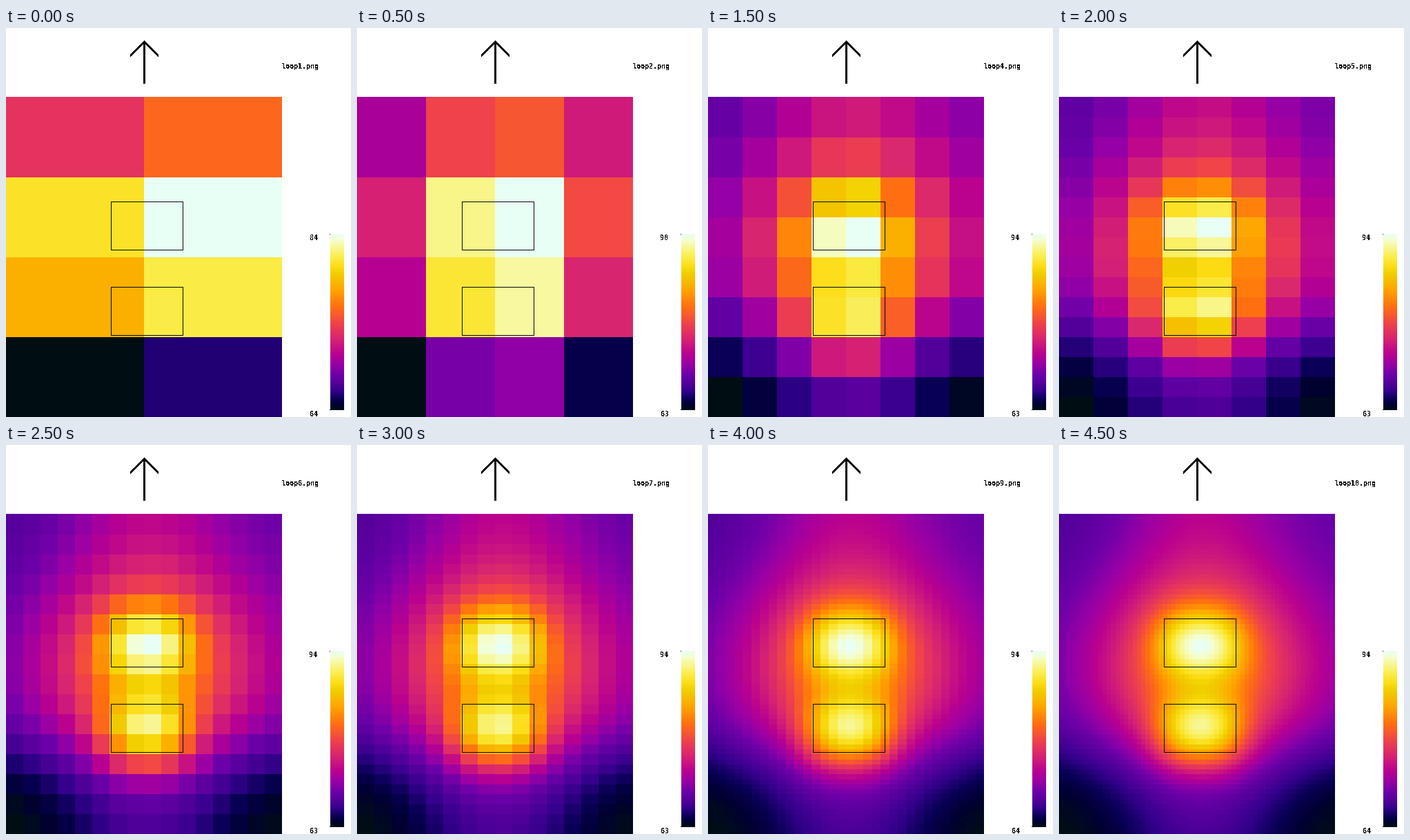
Animation, 500 px wide and 565 px high, one loop 5000 ms. Source, as a matplotlib script:

```python
import math
import numpy as np
import matplotlib.pyplot as plt
from matplotlib.animation import FuncAnimation

W, H, DPI = 500, 565, 100
PX = 72 / DPI
TOP, MAP_W, MAP_H = 100, 400, 465
BAR_X, BAR_Y, BAR_W, BAR_H = 470, 299, 20, 256
BOX_X, BOX_W, BOX_H = 152, 104, 70
BOX_TOPS = (252, 376)
FINE = 64
INK = "#000814"

# Key colours of the scale: position in percent and hex value
STOPS = """0 000e14, 3 000032, 6 080055, 10.5 32008a, 16 58009e, 20 6c00a8,
26 9800a5, 31.6 b80091, 40 d62273, 49.5 f04448, 59 ff7010, 68.5 ffa500,
78 f0d000, 81 fcda10, 87 faec48, 94 f7f9a8, 97 f4fed2, 100 e8fff5"""


def make_palette():
    pairs = [s.split() for s in STOPS.split(",")]
    pos = [float(p) / 100 for p, _ in pairs]
    rgb = np.array([[int(h[i:i + 2], 16) for i in (0, 2, 4)] for _, h in pairs])
    t = np.linspace(0, 1, 256)
    return np.stack([np.interp(t, pos, c) for c in rgb.T], 1).round().astype(np.uint8)


PALETTE = make_palette()
erf = np.vectorize(math.erf)


def colour(v):
    return PALETTE[np.rint(v * 255).astype(int)]


def bell(t, mid, spread):
    return np.exp(-((t - mid) / spread) ** 2 / 2)


def slab(t, start, size, blur=28):
    """A block from start to start + size with blurred edges."""
    s = blur * math.sqrt(2)
    return (erf((t - start) / s) - erf((t - start - size) / s)) / 2


def unit(v):
    return (v - v.min()) / (v.max() - v.min())


def make_field():
    """Two heated blocks in a wide glow, a warm middle and a cold lower end."""
    x = (np.arange(FINE) + 0.5) * MAP_W / FINE
    y = TOP + (np.arange(FINE)[:, None] + 0.5) * MAP_H / FINE
    base = (0.15 + 0.04 * x / MAP_W) / (1 + np.exp((y - 445) / 30))
    ridge = 0.135 * bell(x, 206, 82)
    glow = 0.35 * bell(x, 206, 120) * bell(y, 325, 95)
    upper = 0.50 * slab(y, BOX_TOPS[0], BOX_H)
    lower = 0.59 * slab(y, BOX_TOPS[1] + 6, BOX_H)
    return unit(base + ridge + glow + (upper + lower) * slab(x, BOX_X, BOX_W))


FIELD = make_field()


def heat_map(k):
    """Cell means of step k; each step doubles columns or rows in turn."""
    cols, rows = 2 ** (1 + (k + 1) // 2), 2 ** (2 + k // 2)
    v = unit(FIELD.reshape(rows, FINE // rows, cols, FINE // cols).mean((1, 3)))
    # Coarse grids lean warmer towards the upper right
    lean = np.linspace(0, 0.25, cols) - np.linspace(0, 0.75, rows)[:, None]
    return unit(v + 0.24 * 0.5 ** k * lean)


def map_image(k):
    v = heat_map(k)
    rows, cols = v.shape
    iy = np.arange(MAP_H) * rows // MAP_H
    ix = np.arange(MAP_W) * cols // MAP_W
    return colour(v)[iy][:, ix]


HIGH = [84, 90, 89] + [94] * 7
LOW = [64, 63, 64] + [63] * 4 + [64] * 3

plt.rcParams["text.antialiased"] = False
fig = plt.figure(figsize=(W / DPI, H / DPI), dpi=DPI, facecolor="white")
ax = fig.add_axes([0, 0, 1, 1])


def picture(img, x, y):
    h, w = img.shape[:2]
    return ax.imshow(img, extent=(x, x + w, y + h, y), interpolation="nearest", aspect="auto")


def block(x, y, w, h, color):
    ax.add_patch(plt.Rectangle((x, y), w, h, fc=color, lw=0, antialiased=False))


def outline(x, y, w, h):
    for dy in (0, h):
        block(x, y + dy, w + 1, 1, INK)
    for dx in (0, w):
        block(x + dx, y, 1, h + 1, INK)


def label(x, y):
    return ax.text(x, y, "", family="DejaVu Sans Mono", weight="bold",
                   size=10 * PX, color="black", va="baseline")


heat = picture(map_image(0), 0, TOP)
ramp = colour(np.linspace(1, 0, BAR_H))
picture(np.repeat(ramp[:, None], BAR_W, axis=1), BAR_X, BAR_Y)
for y in (BAR_Y, BAR_Y + BAR_H - 1):
    block(BAR_X - 1, y, 1, 1, INK)

# Arrow
block(199, 20, 3, 61, "black")
for i in range(21):
    for x in (200 - i, 200 + i):
        block(x, 18 + i, 1, 4, "black")

for top in BOX_TOPS:
    outline(BOX_X, top, BOX_W, BOX_H)

name, high, low = label(400, 59), label(440, 308), label(440, 564)
ax.set(xlim=(0, W), ylim=(H, 0))
ax.axis("off")


def draw(k):
    heat.set_data(map_image(k))
    name.set_text(f"loop{k + 1}.png")
    high.set_text(str(HIGH[k]))
    low.set_text(str(LOW[k]))
    return heat, name, high, low


anim = FuncAnimation(fig, draw, frames=10, interval=500, repeat=True,
                     repeat_delay=0, blit=False)
plt.show()
```
